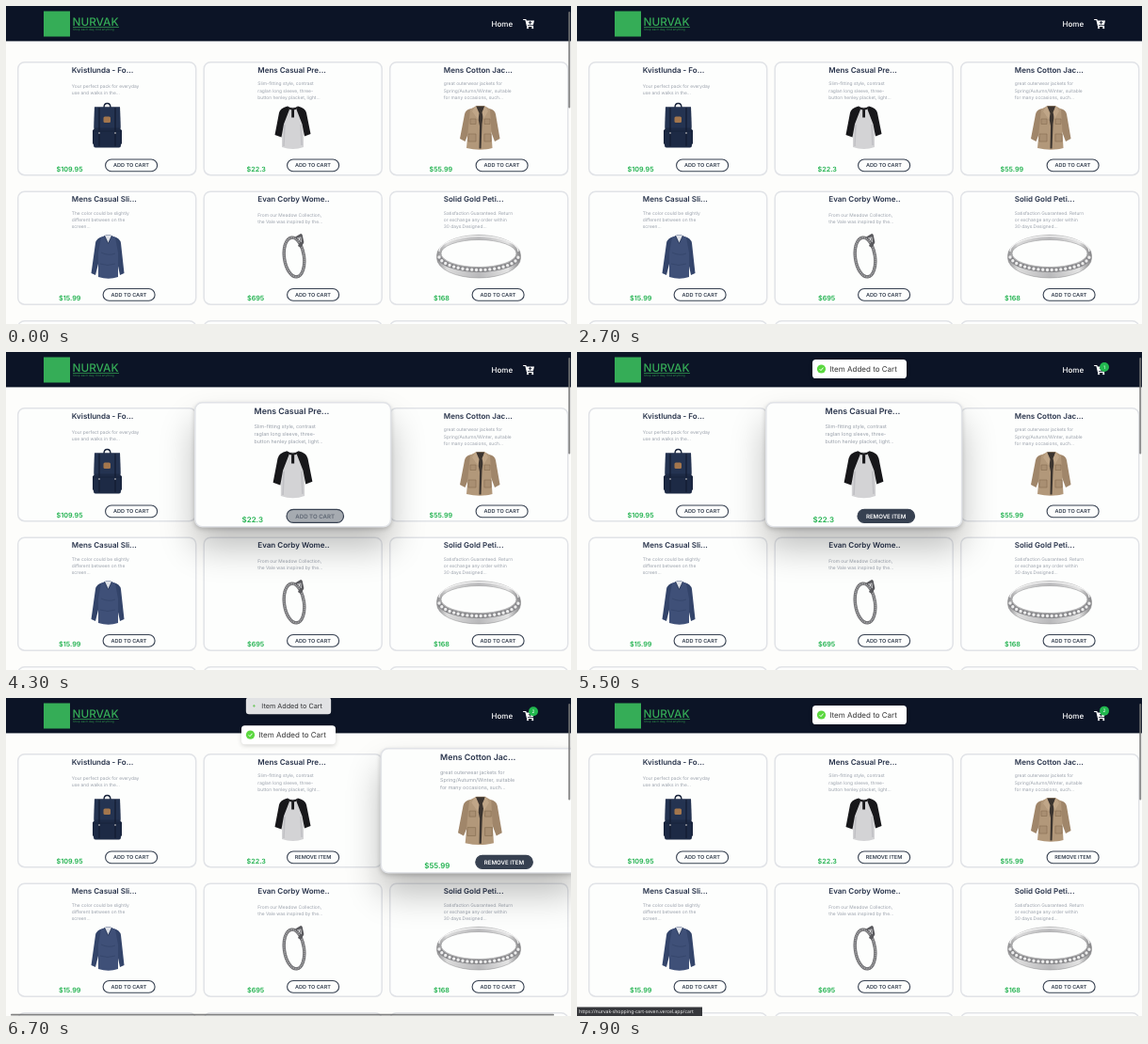
Recreate the animation shown at these times as an HTML page. Size 600x338 px, loop 8 s.

```html
<!DOCTYPE html>
<html lang="en">
<head>
<meta charset="utf-8">
<title>Shop</title>
<style>
  html, body { margin: 0; width: 100%; height: 100%; overflow: hidden; background: #fdfdfb; }
  svg { display: block; width: 100vw; height: 100vh; }
  text { font-family: Inter, "Open Sans", sans-serif; text-rendering: geometricPrecision; }
  .title { font-size: 8px; font-weight: 600; fill: #27324a; }
  .desc { font-size: 4.88px; fill: #9aa1ab; }
  .price { font-size: 7.2px; font-weight: 600; fill: #1cb04b; }
  .label { font-size: 5.55px; font-weight: 600; text-anchor: middle; }
  .toast text { font-size: 8px; fill: #363636; }
  .blur { filter: blur(17px); }
  .soft { filter: blur(2.5px); }
</style>
</head>
<body>
<svg id="stage" viewBox="0 0 600 338" preserveAspectRatio="none">
  <defs>
    <linearGradient id="silver">
      <stop offset="0" stop-color="#8d8d8f"/><stop offset=".12" stop-color="#dcdcdc"/>
      <stop offset=".5" stop-color="#b9b9bb"/><stop offset=".85" stop-color="#e4e4e4"/>
      <stop offset="1" stop-color="#828284"/>
    </linearGradient>
  </defs>
  <rect width="600" height="338" fill="#fdfdfb"/>
  <g id="cards"></g>
  <g id="header">
    <rect width="600" height="37.4" fill="#0c1426"/>
    <rect x="40" y="5.5" width="28" height="27" fill="#35ad57"/>
    <text x="70.5" y="20.8" font-size="11.8" font-weight="500" fill="#35ad57">NURVAK</text>
    <rect x="71" y="22.3" width="49" height=".7" fill="#35ad57"/>
    <text x="71" y="26.4" font-size="3.2" fill="#2c8a48">Shop each day, find anything</text>
    <text x="515.5" y="21.8" font-size="8" font-weight="500" fill="#fff">Home</text>
    <g fill="#fff">
      <path d="M549.6 14.5h2.3l1.7 7h6" fill="none" stroke="#fff" stroke-width="1.2" stroke-linecap="round" stroke-linejoin="round"/>
      <path d="M552.2 15.4h8.8l-1.2 4.8h-6.5z"/>
      <path d="M556.6 15.9v3.6M554.8 17.7h3.6" stroke="#0c1426" stroke-width=".9"/>
      <circle cx="554" cy="23.2" r="1.1"/><circle cx="559.2" cy="23.2" r="1.1"/>
    </g>
    <g id="badge">
      <circle cx="560" cy="16" r="5" fill="#22b84f"/>
      <text id="count" x="560" y="17.7" font-size="4.8" fill="#fff" text-anchor="middle"></text>
    </g>
  </g>
  <g id="toasts"></g>
  <rect id="vbar" x="597.2" y="6" width="2" height="102.5" rx="1" fill="#777" opacity=".85"/>
  <rect id="hbar" x="5" y="335.8" width="577" height="1.8" rx=".9" fill="#6c6c6c" opacity=".85"/>
  <g id="status">
    <rect y="328.5" width="133" height="9.5" fill="#36373b"/>
    <text x="2" y="335" font-size="5.1" fill="#eee" style="font-family:'Noto Sans',sans-serif">https://nurvak-shopping-cart-seven.vercel.app/cart</text>
  </g>
</svg>
<script>
const $ = id => document.getElementById(id);
const LOOP = 8000, STEP = 100;
const CLICK = [5000, 6584];

const art = [
  // backpack
  `<path d="M104 108q0-4.5 3.5-4.5t3.5 4.5" fill="none" stroke="#18233b" stroke-width="1.4"/>
   <path d="M95 130l-3 2v14l2 3zM120 130l3 2v14l-2 3z" fill="#17223a"/>
   <path d="M94 107.500h27l1 40.500q0 2.500-2 2.500H95q-2 0-2-2.500z" fill="#1d2a45"/>
   <path d="M94 107.500h27l.5 22H93.500z" fill="#243351"/>
   <path d="M99 108v41M116 108v41" stroke="#131c31" stroke-width="1.2"/>
   <rect x="103.500" y="117.500" width="7.500" height="6.500" rx="1.500" fill="#a3764d"/>
   <path d="M93 133h29" stroke="#17223a"/>
   <path d="M98 135h2M115 135h2" stroke="#c9c9c9"/>`,
  // raglan shirt
  `<path d="M299 107.500h11l6 16v26.500q-11 4-23 0v-27z" fill="#d3d3d5"/>
   <path d="M296 126l-1 23M313 126l1 22" stroke="#c0c0c4" stroke-width="1.500"/>
   <path d="M299 106.500q-8 2-9 7l-4.500 23.500 7 2.500 2.500-14 6-15.500zM310 106.500q8 2 9 7l4.500 22.500-6.500 2.500-2.500-13-6-15.500z" fill="#17171a"/>
   <path d="M299 106.500q5.500 4 11 0l-.5 2.500q-5 3-10 0zM303.200 109h2.800v9.500h-2.800z" fill="#17171a"/>`,
  // jacket
  `<path d="M494 109q-6 1-7 6l-5 26 5.500 3 6.500-16zM513 109q6 1 7 6l4.500 26-5.500 3-6-16z" fill="#a0866a"/>
   <path d="M493 109.500l7-3.500h8l6 3.500 2.500 41.500q-13 3.500-27.500 0l2-22z" fill="#b2987a"/>
   <path d="M499 106.500h9l-2.500 19-1 26h-2l.5-24z" fill="#3b342f"/>
   <path d="M499 106l-4 6 6.500 9 1-7zM508.500 106l3.500 6-5 8-1.500-7z" fill="#c0a688"/>
   <path d="M493 120h6v5.500h-6zM508 120h6v5.500h-6zM491 136h8v8h-8zM508 136h7v8h-7z" fill="#a98f72" stroke="#866d52" stroke-width=".6"/>`,
  // long sleeve
  `<path d="M103 245q-7 1.500-8 7l-4.500 32 4.500 2 6-24zM114 245q7 1.500 8 7l3.500 32-4.500 2-5-24z" fill="#33446a"/>
   <path d="M101 246l5-2.500h5l5 2.500 3 16v26q-10 3.500-21 0v-26z" fill="#3f5078"/>
   <path d="M104.500 244l4 8.500 4-8.500" fill="#dfe2e8" stroke="#2b3b5e"/>
   <path d="M101 262q8 4 15 1M100 274q8 3 16 0" fill="none" stroke="#36476d"/>`,
  // bracelet
  `<g fill="none">
     <g transform="rotate(-8 306 267)">
       <ellipse cx="306" cy="267" rx="10.500" ry="21" stroke="#6c6c6f" stroke-width="3.400"/>
       <ellipse cx="306" cy="267" rx="10.500" ry="21" stroke="#adadb0" stroke-width="1.800" stroke-dasharray="1 .9"/>
     </g>
     <path d="M308 247l5-3 1.500 7-3 5" stroke="#5a5a5e" stroke-width="3.600" stroke-linejoin="round"/>
     <path d="M309 247l4-1 .5 5" stroke="#b5b5b8" stroke-width="1.200"/>
   </g>`,
  // ring
  `<path fill-rule="evenodd" fill="url(#silver)" stroke="#8b8b8d" stroke-width=".5"
     d="M457.500 265a44.500 21.500 0 0 1 89 0v3a44.500 21 0 0 1-89 0zM462 263a40 14.500 0 0 0 80 0a40 14.500 0 0 0-80 0z"/>
   <path d="M460 261a42 16.300 0 0 1 84 0" fill="none" stroke="#f5f5f5" stroke-width="1.200"/>
   <path d="M460 267a42.500 16 0 0 0 84 0" fill="none" stroke="#88888b" stroke-width="5"/>
   <path d="M460 267a42.500 16 0 0 0 84 0" fill="none" stroke="#ededed" stroke-width="3.400" stroke-linecap="round" stroke-dasharray="0 4.800"/>`
];

// title, description lines, price, price x, button x
const items = [
  ['Kvistlunda - Fo...', ['Your perfect pack for everyday', 'use and walks in the...'], '$109.95', 53.5, 105],
  ['Mens Casual Pre...', ['Slim-fitting style, contrast', 'raglan long sleeve, three-', 'button henley placket, light...'], '$22.3', 255.5, 298],
  ['Mens Cotton Jac...', ['great outerwear jackets for', 'Spring/Autumn/Winter, suitable', 'for many occasions, such...'], '$55.99', 449.5, 498.5],
  ['Mens Casual Sli...', ['The color could be slightly', 'different between on the', 'screen...'], '$15.99', 56, 102.5],
  ['Evan Corby Wome..', ['From our Meadow Collection,', 'the Vale was inspired by the...'], '$695', 256, 298],
  ['Solid Gold Peti...', ['Satisfaction Guaranteed. Return', 'or exchange any order within', '30 days.Designed...'], '$168', 454, 494.5]
];

const frame = (x, y) =>
  `<rect x="${x + .7}" y="${y + .7}" width="189" height="120" rx="7" fill="#fdfefd" stroke="#e1e3e7" stroke-width="1.5"/>`;

function cardMarkup([title, lines, price, px, bx], i) {
  const x = 12 + i % 3 * 197.5, y = 59 + Math.floor(i / 3) * 137.5;
  const top = y + (lines.length < 3 ? 27.8 : 25.4);
  const desc = lines.map((s, n) => `<text class="desc" x="${x + 57.8}" y="${top + n * 7.1}">${s}</text>`).join('');
  return `<g class="card" data-x="${x + 95}" data-y="${y + 60.5}">
    <g class="shadow" opacity="0">
      <rect class="blur" x="${x}" y="${y + 20}" width="190" height="121" rx="8" opacity=".25"/>
      <rect class="soft" x="${x}" y="${y + 2}" width="190" height="121" rx="8" opacity=".2"/>
    </g>
    ${frame(x, y)}
    <text class="title" x="${x + 57.8}" y="${y + 11.8}">${title}</text>${desc}${art[i]}
    <text class="price" x="${px}" y="${y + 116.8}">${price}</text>
    <rect class="button" x="${bx + .6}" y="${y + 104}" width="55" height="12.8" rx="6.4" fill="#374151" fill-opacity="0" stroke="#374151" stroke-width="1.1"/>
    <text class="label" x="${bx + 28}" y="${y + 112.4}" fill="#374151">ADD TO CART</text>
  </g>`;
}

$('cards').innerHTML = [0, 1, 2].map(c => frame(12 + c * 197.5, 334)).join('') + items.map(cardMarkup).join('');
const cards = [...document.querySelectorAll('.card')];

$('toasts').innerHTML = CLICK.map(() => `<g class="toast">
  <rect class="soft" x="250" y="9.5" width="100" height="20" rx="3.6" opacity=".16"/>
  <rect x="250" y="8" width="100" height="20" rx="3.6" fill="#fff"/>
  <g class="icon"><circle r="4.6" fill="#5bd83f"/>
    <path d="M-1.9 .2l1.4 1.4 2.5-3" fill="none" stroke="#fff" stroke-width="1"/></g>
  <text x="268.3" y="20.8">Item Added to Cart</text></g>`).join('');
const toasts = [...document.querySelectorAll('.toast')];

const clamp = v => Math.min(1, Math.max(0, v));

function bezier(x1, y1, x2, y2) {
  const at = (a, b, s) => 3 * a * s * (1 - s) ** 2 + 3 * b * s * s * (1 - s) + s ** 3;
  return x => {
    if (x <= 0 || x >= 1) return clamp(x);
    let lo = 0, hi = 1;
    for (let i = 0; i < 24; i++) {
      const mid = (lo + hi) / 2;
      if (at(x1, x2, mid) < x) lo = mid; else hi = mid;
    }
    return at(y1, y2, lo);
  };
}
const easeIn = bezier(.4, 0, 1, 1), slide = bezier(.21, 1.02, .73, 1), leave = bezier(.06, .71, .55, 1);
const pop = bezier(.175, .885, .32, 1.275), fall = bezier(.8, 0, 1, 1), rise = bezier(0, 0, .2, 1);

const pulse = (t, on, off) => easeIn(clamp((t - on) / 300)) - easeIn(clamp((t - off) / 300));
const show = (el, on) => el.setAttribute('visibility', on ? 'visible' : 'hidden');

function poseCard(card, hover, press, added) {
  const { x, y } = card.dataset, part = name => card.querySelector('.' + name);
  card.setAttribute('transform', `translate(${x} ${y}) scale(${1 + hover * .1}) translate(${-x} ${-y})`);
  part('shadow').setAttribute('opacity', hover);
  part('button').setAttribute('fill-opacity', press);
  const mix = c => Math.round(c + (255 - c) * press ** 2);
  part('label').setAttribute('fill', `rgb(${mix(55)},${mix(65)},${mix(81)})`);
  part('label').textContent = added ? 'REMOVE ITEM' : 'ADD TO CART';
}

function poseToast(el, age, push) {
  show(el, age >= 0 && age < 2400);
  const come = slide(clamp(age / 350)), go = leave(clamp((age - 2000) / 400));
  const dy = push * 23.5 - 40 * (1 - come) - 30 * go;
  const size = .6 + .4 * come - .4 * go;
  el.setAttribute('transform', `translate(300 ${18 + dy}) scale(${size}) translate(-300 -18)`);
  el.setAttribute('opacity', (.5 + .5 * come) * (1 - go));
  const p = pop(clamp((age - 100) / 300));
  el.querySelector('.icon').setAttribute('transform', `translate(259.5 18) rotate(${45 * (1 - p)}) scale(${p})`);
}

function draw(now) {
  const t = Math.floor(now % LOOP / STEP) * STEP;
  const active = cards[t < 5700 ? 1 : 2];
  if (active.parentNode.lastChild !== active) active.parentNode.append(active);
  poseCard(cards[1], pulse(t, 3550, 5550), pulse(t, 4120, 5550), t >= CLICK[0]);
  poseCard(cards[2], pulse(t, 5700, 7300), pulse(t, 6150, 7300), t >= CLICK[1]);

  poseToast(toasts[0], t - CLICK[0], slide(clamp((t - CLICK[1]) / 230)));
  poseToast(toasts[1], t - CLICK[1], 0);

  const phase = (t - CLICK[0] + LOOP) % 1000 / 500;
  const lift = phase < 1 ? 1 - fall(phase) : rise(phase - 1);
  $('badge').setAttribute('transform', `translate(0 ${-2.4 * lift})`);
  show($('badge'), t >= CLICK[0]);
  $('count').textContent = t >= CLICK[1] ? 2 : 1;

  show($('vbar'), t < 500 || t >= 3400);
  show($('hbar'), t >= 5800 && t < 7600);
  show($('status'), t >= 7700);
  requestAnimationFrame(() => draw(performance.now() - start));
}
const start = performance.now();
draw(0);
</script>
</body>
</html>
```
